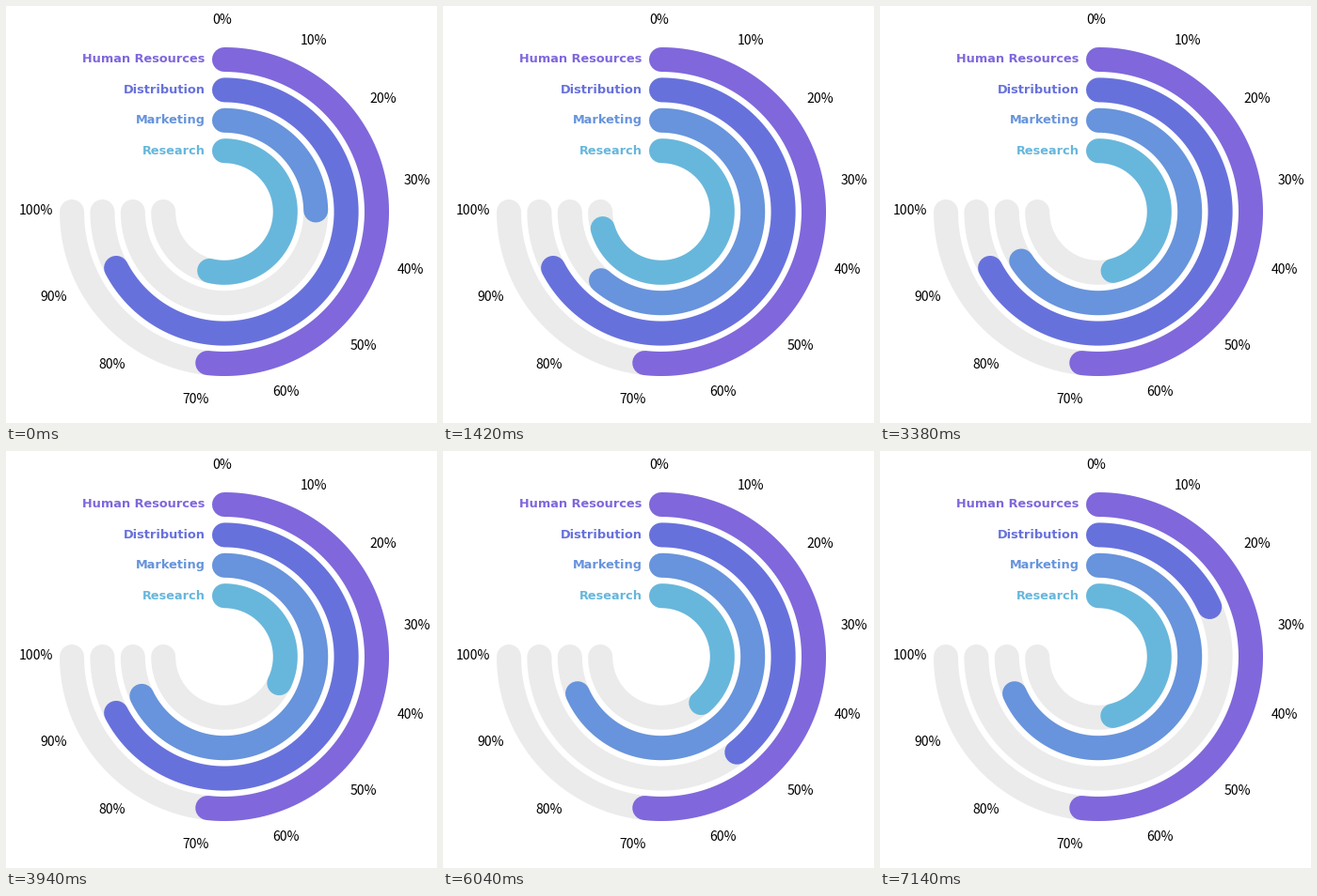
A matplotlib script that plays this animation: 458x444 px, repeating every 8 s.

```python
import numpy as np
import matplotlib.pyplot as plt
from matplotlib.animation import FuncAnimation

W, H, DPI = 458, 444, 64
LOOP, STEP = 8000, 20
CX, CY = 232, 219
OUTER, GAP, BAR = 162, 32.4, 26
SWEEP = 270

# name, colour, first value in percent; outermost ring first
BARS = (("Human Resources", "#8067dc", 69),
        ("Distribution", "#6771dc", 89.8),
        ("Marketing", "#6794dc", 33),
        ("Research", "#67b7dc", 71.9))
TRACK = "#ebebeb"

# start time and the new values of the bars that change
DURATION = 1800
MOVES = ((150, {"Marketing": 83.2, "Research": 94.6}),
         (2920, {"Marketing": 91.2, "Research": 38.3}),
         (5600, {"Distribution": 24.2, "Research": 61.7}))


def px(size):
    return size * 72 / DPI


def ease_out(k):
    return 1 - (1 - np.clip(k, 0, 1)) ** 3


def arc(radius, value):
    a = np.radians(np.linspace(0, SWEEP * value / 100, 120))
    return CX + radius * np.sin(a), CY - radius * np.cos(a)


def values(t):
    now = {name: first for name, _, first in BARS}
    for start, goals in MOVES:
        k = ease_out((t - start) / DURATION)
        for name, goal in goals.items():
            now[name] += (goal - now[name]) * k
    return now


fig = plt.figure(figsize=(W / DPI, H / DPI), dpi=DPI, facecolor="white")
ax = fig.add_axes((0, 0, 1, 1))
ax.set(xlim=(0, W), ylim=(H, 0))
ax.axis("off")


def ring(radius, value, color, z):
    return ax.plot(*arc(radius, value), color=color, lw=px(BAR), zorder=z,
                   solid_capstyle="round", solid_joinstyle="round")[0]


rings = {}
for i, (name, color, first) in enumerate(BARS):
    r = OUTER - GAP * i
    ring(r, 100, TRACK, 1)
    rings[name] = r, ring(r, first, color, 2)
    ax.text(211.5, CY - r + 3.3, name, ha="right", va="baseline",
            color=color, family="DejaVu Sans", weight="bold", size=px(12.85))

for v in range(0, 101, 10):
    a = np.radians(SWEEP * v / 100)
    ax.text(CX - 12.5 + 206 * np.sin(a), CY + 3 - 203 * np.cos(a), f"{v}%",
            ha="left", va="baseline", color="black",
            family="Noto Sans CJK JP", size=px(14))


def update(i):
    now = values(i * STEP)
    for name, (r, line) in rings.items():
        line.set_data(*arc(r, now[name]))
    return [line for _, line in rings.values()]


anim = FuncAnimation(fig, update, frames=LOOP // STEP, interval=STEP,
                     repeat=True, repeat_delay=0, blit=False)
plt.show()
```
